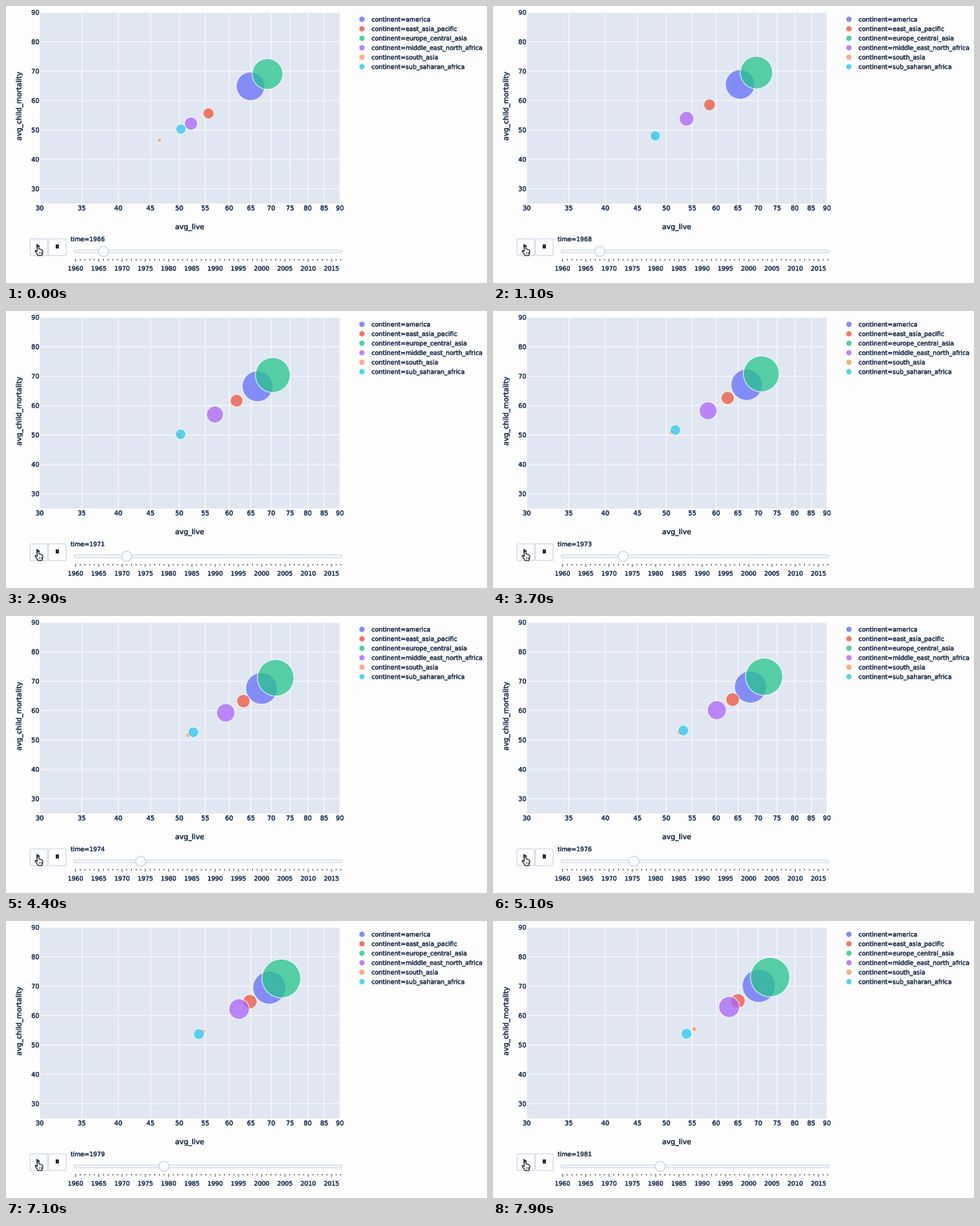
Animation, 600 px wide and 345 px high, one loop 8 s. Source, as a matplotlib script:

```python
import numpy as np
import matplotlib.pyplot as plt
from matplotlib import patheffects
from matplotlib.animation import FuncAnimation
from matplotlib.patches import Circle, FancyBboxPatch, Polygon, Rectangle

W, H, DPI = 600, 345, 120
PX = 72 / DPI  # points per pixel
INTERVAL, FRAMES = 100, 80
STEP, FIRST_STEP, GRIP_MS = 525, -214, 150

INK, PAPER, PLOT = "#223453", "#fdfdfe", "#e0e7f2"
BORDER, RAIL = "#c8d1df", "#f8fafc"

plt.rcParams.update({"font.family": "DejaVu Sans", "text.hinting": "none"})
fig = plt.figure(figsize=(W / DPI, H / DPI), dpi=DPI, facecolor=PAPER)
ax = fig.add_axes([0, 0, 1, 1])
ax.set(xlim=(0, W), ylim=(H, 0))
ax.axis("off")

# name, colour, (first, last) value, curve, wave, (first, last) radius
SERIES = [
    ("america", "#636efa", (64.9, 70.15), -0.4, 0, (17.8, 20.7)),
    ("east_asia_pacific", "#ef553b", (55.65, 65), 2.4, 0, (6.8, 9)),
    ("europe_central_asia", "#26c58b", (69.05, 73.1), -0.3, 0, (19.1, 24.5)),
    ("middle_east_north_africa", "#ab63fa", (52.2, 62.95), 0.8, -0.8, (8.1, 13)),
    ("south_asia", "#fb9a6a", (46.5, 55.4), 0.2, 0, (2.8, 3.3)),
    ("sub_saharan_africa", "#29caee", (50.3, 53.85), 0, -5.5, (6.3, 6.7)),
]


def x_pos(v):
    return 42 + 374.5 * np.log(v / 30) / np.log(3)


def y_pos(v):
    return 8 + (90 - v) * 238 / 65


def year_x(year):
    return 86.8 + (year - 1960) * 5.805


def label(x, y, s, size, **kw):
    bold = patheffects.withStroke(linewidth=0.3 * PX, foreground=INK)
    return ax.text(x, y, s, fontsize=size * PX, color=INK, va="baseline",
                   path_effects=[bold], **kw)


def line(xs, ys, color, width, z=1):
    ax.plot(xs, ys, color=color, lw=width * PX, zorder=z,
            solid_capstyle="butt", snap=False)


def box(x0, y0, x1, y1, r, fill):
    ax.add_patch(FancyBboxPatch(
        (x0, y0), x1 - x0, y1 - y0, boxstyle=f"round,pad=0,rounding_size={r}",
        fc=fill, ec=BORDER, lw=0.9 * PX, zorder=3))


def draw_plot():
    ax.add_patch(Rectangle((42, 8), 374.5, 238, fc=PLOT, lw=0, zorder=0))
    for v in range(30, 91, 5):
        line([x_pos(v)] * 2, [8, 246], "white", 0.8)
        label(x_pos(v), 254.4, str(v), 7.9, ha="center")
    for v in range(30, 91, 10):
        line([42, 416.5], [y_pos(v)] * 2, "white", 0.8)
        label(41.6, y_pos(v) + 2.8, str(v), 7.9, ha="right")
    label(229.2, 278, "avg_live", 8.85, ha="center")
    label(19.1, 125, "avg_child_mortality", 8.8, ha="center",
          rotation=90, rotation_mode="anchor")


def draw_legend():
    for i, (name, color, *_) in enumerate(SERIES):
        y = 16.6 + 11.8 * i
        ax.add_patch(Circle((444, y), 3.3, fc=color, lw=0, alpha=0.8))
        label(456, y + 2.7, "continent=" + name, 7.63)


def draw_controls():
    box(30, 290, 52, 310.8, 1.2, "#f9fbff")
    box(53, 290, 75, 310.8, 1.2, "white")
    ax.add_patch(Polygon([(38, 296), (42.6, 299), (38, 302)], fc=INK, lw=0, zorder=4))
    ax.add_patch(Rectangle((61.8, 297.3), 4.2, 4.2, fc="#1d2c46", lw=0, zorder=4))
    hand = [(39, 299.6), (40, 298.6), (41, 299.6), (41.2, 302.7), (43, 303),
            (44.7, 303.6), (46, 305.2), (45.6, 308), (44.7, 310.8), (40, 310.8),
            (38.6, 308.4), (36.6, 305.8), (36.5, 304.7), (37.5, 304.4), (39, 305.8)]
    ax.add_patch(Polygon(hand, fc="white", ec="#111111", lw=PX, zorder=5))
    for x in (41.4, 43, 44.5):
        line([x, x], [306.3, 309], "#333333", 0.6, 6)

    box(85, 304, 419, 307.2, 1.5, RAIL)
    for year in range(1960, 2018):
        major = year % 5 == 0
        line([year_x(year)] * 2, [315, 318.7 if major else 317], "#3a3a3a", 0.85)
        if major:
            label(year_x(year), 329.5, str(year), 7.6, ha="center")


draw_plot()
draw_legend()
draw_controls()

bubbles = [ax.add_patch(Circle((0, 0), 1, fc=s[1], ec="white", lw=1.05 * PX,
                               alpha=0.75, zorder=10 + i))
           for i, s in enumerate(SERIES)]
grip = ax.add_patch(Circle((0, 305.6), 6.3, fc=RAIL, ec=BORDER, lw=PX, zorder=8))
clock = label(80.6, 293, "", 7.55)


def cubic_in_out(u):
    return 4 * u ** 3 if u < 0.5 else 1 - 4 * (1 - u) ** 3


def ease(u, k):
    """Exponential ease from 0 to 1: out for k > 0, in for k < 0."""
    return np.expm1(-k * u) / np.expm1(-k) if k else u


def mix(ends, u):
    return ends[0] + (ends[1] - ends[0]) * u


def update(n):
    t = n * INTERVAL
    step, since = divmod(t - FIRST_STEP, STEP)
    year = 1966 + step
    clock.set_text(f"time={year}")
    moved = cubic_in_out(min(since / GRIP_MS, 1))
    grip.center = year_x(year - 1 + moved), 305.6

    u = n / (FRAMES - 1)
    swing = np.sin(2 * np.pi * u) * np.exp(-3 * u)
    for bubble, (_, _, values, curve, wave, radii) in zip(bubbles, SERIES):
        v = mix(values, ease(u, curve)) + wave * swing
        bubble.center = x_pos(v), y_pos(v)
        bubble.set_radius(mix(radii, ease(u, 1)))
    return [*bubbles, grip, clock]


anim = FuncAnimation(fig, update, frames=FRAMES, interval=INTERVAL,
                     repeat=True, repeat_delay=0, blit=False)
plt.show()
```
